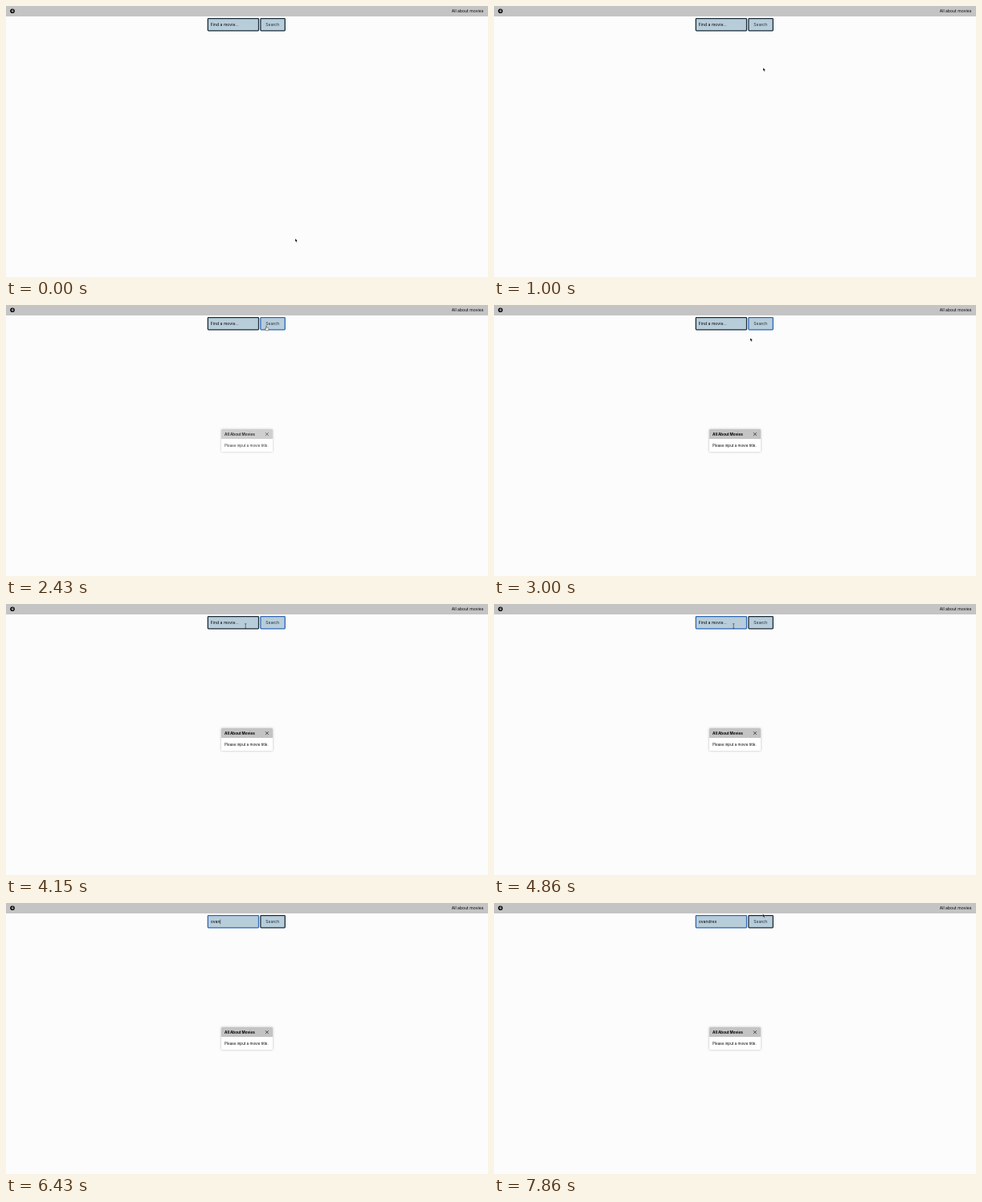
Write an HTML page that moves like this. It is 600 px wide and 338 px high and loops after 8 s.

```html
<!DOCTYPE html>
<html lang="en">
<head>
<meta charset="utf-8">
<title>Movie search</title>
<style>
  html, body { margin: 0; width: 100%; height: 100%; overflow: hidden; background: #fcfcfc; }
  svg { display: block; width: 600px; height: 338px; font: 5.1px Inter, sans-serif; }
  text { white-space: pre; }
  .field { fill: #b8cdda; stroke: #1c2c3a; stroke-width: 1.3; }
  .field.focus { stroke: #2f68b4; }
  .small { font-size: 4.55px; }
  .stroke { fill: none; stroke-linecap: round; stroke-linejoin: round; }
  #modal { filter: drop-shadow(0 .7px 1.6px #0004); }
</style>
</head>
<body>
<svg viewBox="0 0 600 338">
  <rect width="600" height="13" fill="#c4c4c4"/>
  <circle cx="8" cy="6.2" r="2.8"/>
  <path class="stroke" d="M8.6 4.7 7.1 6.2 8.6 7.7M7.2 6.2h2.2" stroke="#ddd" stroke-width=".8"/>
  <text x="594.4" y="8.2" text-anchor="end">All about movies</text>

  <rect id="input" class="field" x="251.3" y="15.7" width="63.2" height="15.2" rx=".8"/>
  <text id="query" x="254.8" y="25.4"></text>
  <path id="caret" d="M0 20.6v5.8" stroke="#000" stroke-width=".5"/>
  <rect id="button" class="field" x="316.9" y="15.7" width="30.4" height="15.2" rx=".8"/>
  <text x="331.8" y="25.4" text-anchor="middle" fill="#1c2c3a">Search</text>

  <g id="modal">
    <rect x="268" y="155" width="64" height="28" rx="1" fill="#fff"/>
    <path d="M268 167v-11q0-1 1-1h62q1 0 1 1v11z" fill="#c4c4c4"/>
    <text class="small" x="272" y="162.8" font-weight="700">All About Movies</text>
    <path class="stroke" d="m323.2 159.4 3.4 3.4m0-3.4-3.4 3.4" stroke="#222" stroke-width=".7"/>
    <text class="small" x="272" y="176.9">Please input a movie title.</text>
  </g>

  <g id="pointer">
    <path id="arrow" d="M0 0v4.1l.9-.8.7 1.5.8-.4-.7-1.4h1.2z" stroke="#fff" stroke-width=".3"/>
    <path id="hand" class="stroke" style="fill:#fff" stroke="#333" stroke-width=".5"
      d="M-.5 0q.5-.6 1 0v2l2 .5q.7.3.5 1.2l-.5 1.8H-.4l-1.5-2q.2-.9 1.4 0z"/>
    <path id="beam" class="stroke" d="M-.8-2.6 0-2.2.8-2.6M0-2.2v5M-.8 3.2 0 2.8.8 3.2" stroke="#333" stroke-width=".6"/>
  </g>
</svg>
<script>
const LOOP = 8000, STEP = 1000 / 7;
const el = id => document.getElementById(id);
const show = (id, on) => { el(id).style.display = on ? '' : 'none'; };

const WORD = 'ovandres';
const KEY_STEPS = [42, 43, 44, 45, 48, 49, 51, 54];
const SEARCH_CLICK = 16, INPUT_CLICK = 30, MOUSE_BACK = 54;

// step, x, y
const PATH = [
  [0, 360, 290], [2, 360, 290], [4, 336, 169], [5, 336, 169], [7, 335, 77], [8, 335, 77],
  [13, 324, 26.3], [19, 324, 26.3], [21, 319, 41], [24, 309, 50], [27, 301, 43],
  [29, 298.2, 27.2], [53, 298.2, 27.2], [55, 334.7, 13.6]
];

function pointerAt(step) {
  const i = Math.max(1, PATH.findIndex(p => p[0] >= step));
  const [s0, x0, y0] = PATH[i - 1], [s1, x1, y1] = PATH[i];
  const k = (step - s0) / (s1 - s0);
  return [x0 + (x1 - x0) * k, y0 + (y1 - y0) * k];
}

function draw(step) {
  const typed = KEY_STEPS.filter(s => s <= step).length;
  const typing = typed > 0 && step < MOUSE_BACK;
  const inputFocus = step >= INPUT_CLICK;

  el('input').classList.toggle('focus', inputFocus);
  el('button').classList.toggle('focus', step >= SEARCH_CLICK && !inputFocus);
  el('modal').style.opacity = Math.max(0, Math.min(1, (step - SEARCH_CLICK + 1) * .4));

  el('query').textContent = typed ? WORD.slice(0, typed) : 'Find a movie...';
  const blinkOn = inputFocus && (step < 34 || (step >= 37 && step < 40));
  show('caret', typing || blinkOn);
  const caretX = 255 + (typed ? el('query').getComputedTextLength() : 0);
  el('caret').setAttribute('transform', `translate(${caretX})`);

  const [x, y] = pointerAt(step);
  const inRow = y > 15 && y < 31.5;
  const overInput = inRow && x > 251 && x < 315;
  const overButton = inRow && x > 316 && x < 348;
  show('pointer', !typing);
  show('beam', overInput);
  show('hand', overButton);
  show('arrow', !overInput && !overButton);
  el('pointer').setAttribute('transform', `translate(${x} ${y})`);
}

const start = performance.now();
function tick() {
  const time = (performance.now() - start) % LOOP;
  // The small lead absorbs timing rounded to hundredths of a second.
  draw(Math.min(55, Math.floor((time + 5) / STEP)));
  requestAnimationFrame(tick);
}
tick();
</script>
</body>
</html>
```
